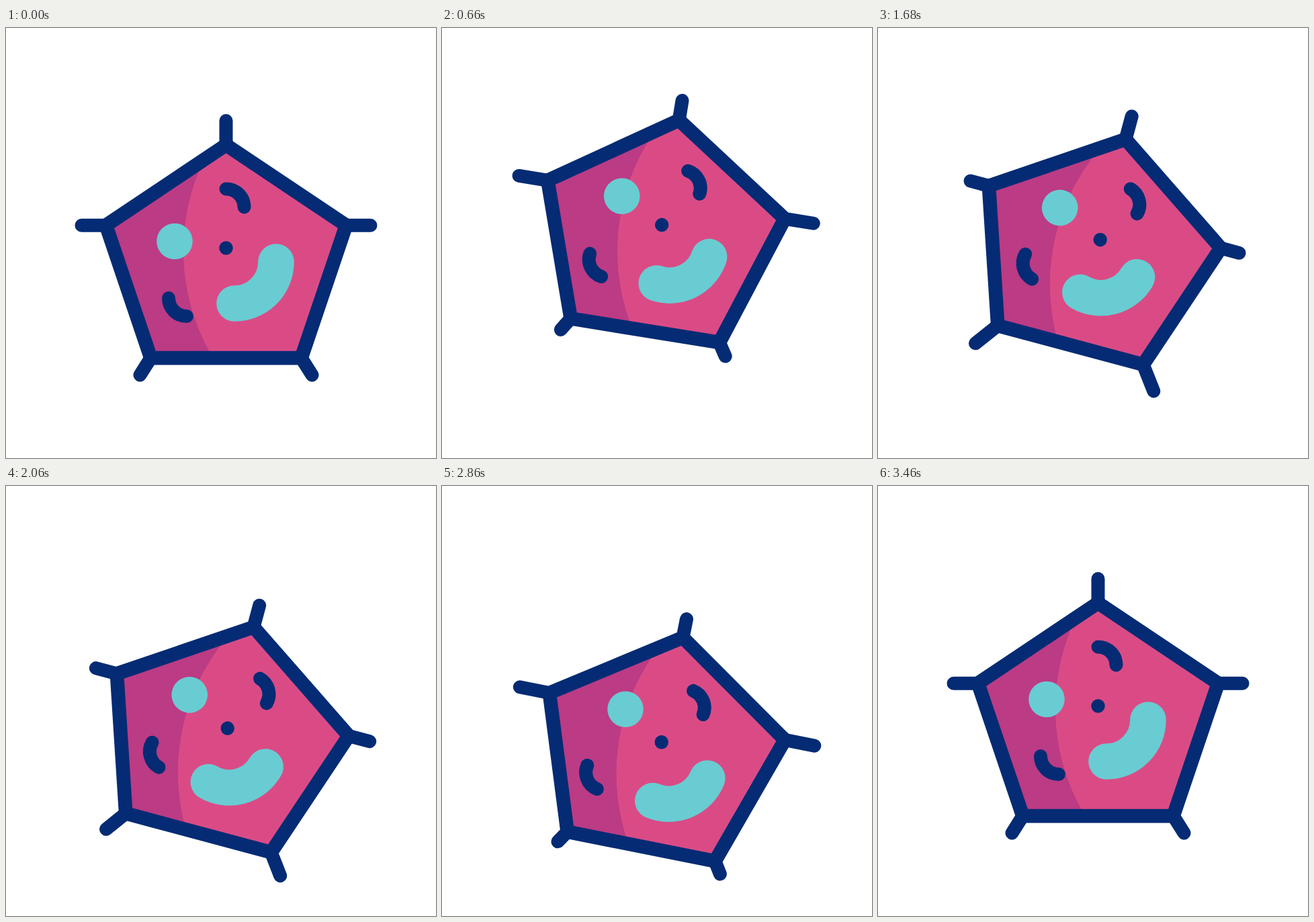
Recreate the animation shown at these times as an HTML page. Size 640x640 px, loop 3.62 s.

```html
<!DOCTYPE html>
<html lang="en">
<head>
<meta charset="utf-8">
<title>Floating cell</title>
<style>
  html, body { margin: 0; width: 100%; height: 100%; overflow: hidden; background: #fff; }
  svg { display: block; width: 100vw; height: 100vh; }
  .line { fill: none; stroke: #042b74; stroke-width: 20; stroke-linecap: round; stroke-linejoin: round; }
  #outline { stroke-width: 20.7; }
</style>
</head>
<body>
<svg viewBox="0 0 640 640">
  <defs>
    <clipPath id="inside"><path id="clip"/></clipPath>
  </defs>
  <g id="body">
    <g clip-path="url(#inside)">
      <rect width="640" height="640" fill="#bb3b84"/>
      <circle cx="576" cy="331" r="312" fill="#da4b85"/>
    </g>
    <path id="outline" class="line"/>
    <path id="spikes" class="line"/>
    <g id="face">
      <circle id="spot" cx="251" cy="317.5" r="26.8" fill="#69ccd2"/>
      <path id="bean" d="M402 348A62 62 0 0 1 340 410" fill="none" stroke="#69ccd2" stroke-width="53.6" stroke-linecap="round"/>
      <path id="upper" class="line" d="M327.5 239.5A27 27 0 0 1 354.5 266.5"/>
      <path id="lower" class="line" d="M242 402A27 27 0 0 0 269 429"/>
      <circle id="dot" cx="327.5" cy="327.5" r="10.2" fill="#042b74"/>
    </g>
  </g>
</svg>
<script>
  const LOOP = 3620, STEP = 20, START = 200, BEAT = 800;
  const CX = 327.5, CY = 332.5, FACE_Y = 337;
  const TILT = 15, RISE = 63.5, DROP = 64.5;

  const $ = id => document.getElementById(id);
  const corners = [[327.5, 174], [506.2, 293.7], [439.5, 491.1], [215.5, 491.1], [148.8, 293.7]];

  // Resting tip, then its offset when squeezed and when stretched
  const tips = [
    { at: [327.5, 138], squeeze: [0, 10.5], stretch: [0, 0] },
    { at: [542.5, 293.7], squeeze: [11.4, 0], stretch: [-9.3, 0] },
    { at: [455.5, 516.5], squeeze: [-6.5, -10.9], stretch: [10.3, 10] },
    { at: [199.5, 516.5], squeeze: [6.5, -10.9], stretch: [-10.3, 10] },
    { at: [112.5, 293.7], squeeze: [-11.4, 0], stretch: [9.3, 0] }
  ];

  // Drift of each inner part when squeezed
  const drift = {
    spot: [8.8, -12],
    bean: [10, 11.5],
    upper: [17.2, 6.6],
    lower: [-6.4, 7.2],
    dot: [-2, 7.5]
  };

  const shape = 'M' + corners.join('L') + 'Z';
  $('clip').setAttribute('d', shape);
  $('outline').setAttribute('d', shape);

  const move = (id, value) => $(id).setAttribute('transform', value);

  // Eased progress from beat a to beat b
  function ease(beat, a, b) {
    const u = Math.min(1, Math.max(0, (beat - a) / (b - a)));
    return u * u * (3 - 2 * u);
  }

  function draw(ms) {
    const beat = (ms - START) / BEAT;
    const turn = ease(beat, 0, 1) - ease(beat, 3, 4);
    const stretch = ease(beat, 1, 2) - ease(beat, 2, 3);
    const squeeze = turn - stretch;
    const lift = (RISE + DROP) * ease(beat, 1, 3) - RISE * ease(beat, 0, 1) - DROP * ease(beat, 3, 4);
    const angle = TILT * turn;

    move('body', `translate(0 ${lift}) rotate(${angle} ${CX} ${CY})`);
    move('face', `rotate(${angle} ${CX} ${FACE_Y})`);
    for (const id in drift) move(id, `translate(${drift[id].map(v => v * squeeze)})`);

    $('spikes').setAttribute('d', tips.map((tip, i) => {
      const end = tip.at.map((v, k) => v + tip.squeeze[k] * squeeze + tip.stretch[k] * stretch);
      return `M${corners[i]}L${end}`;
    }).join(''));
  }

  const begin = performance.now();
  function tick() {
    const ms = (performance.now() - begin) % LOOP;
    draw(Math.floor(ms / STEP) * STEP);
    requestAnimationFrame(tick);
  }
  tick();
</script>
</body>
</html>
```
